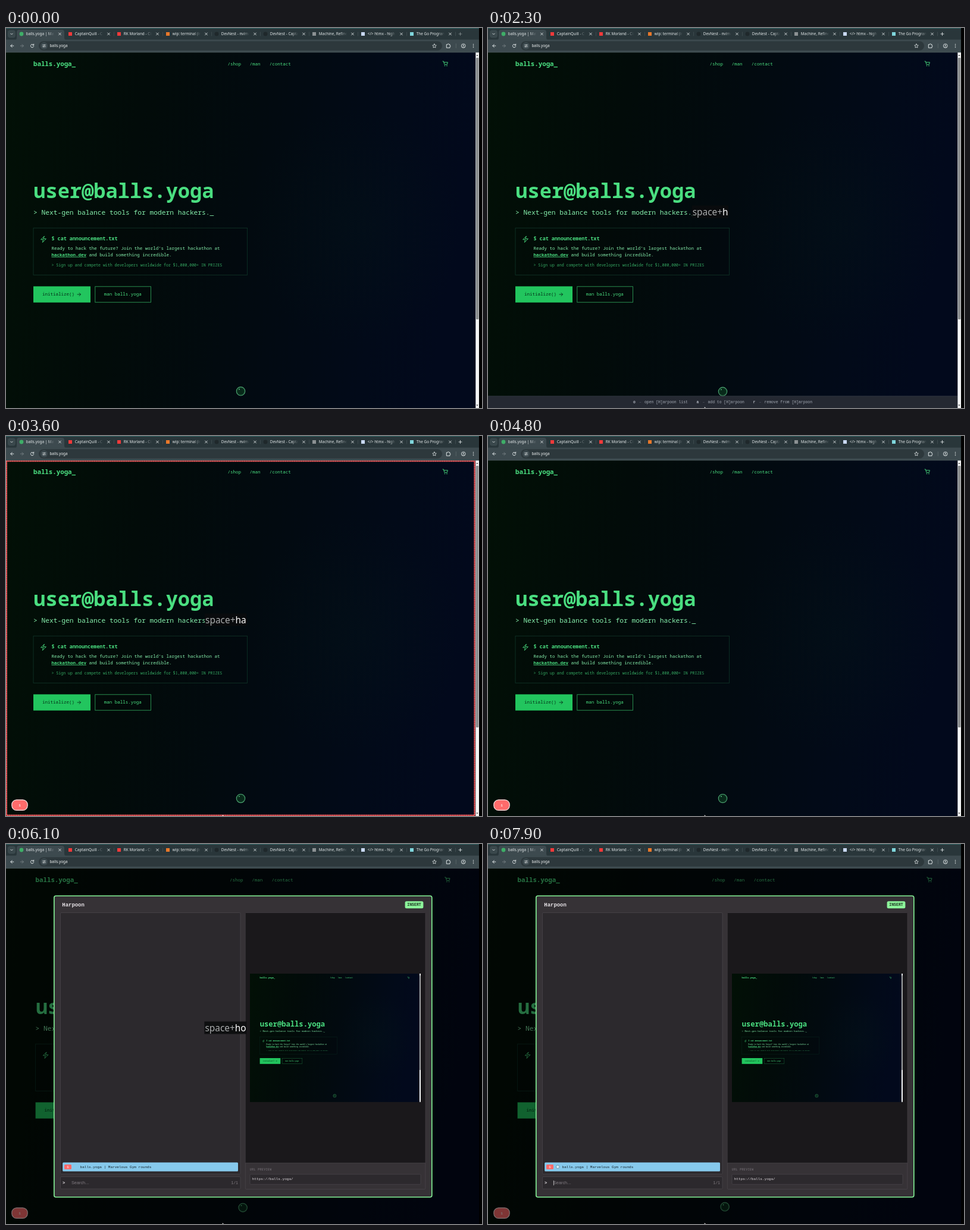
These frames come from a looping animation (800x639 px, 8000 ms). An HTML page:

```html
<!DOCTYPE html>
<html lang="en">
<head>
<meta charset="utf-8">
<title>balls.yoga</title>
<style>
html, body { margin: 0; width: 100%; height: 100%; overflow: hidden; background: #000; }
svg { display: block; width: 100%; height: 100%; }
text { white-space: pre; }
.page { font-family: "Noto Sans Mono", "DejaVu Sans Mono", monospace; }
.ui { font-family: "Noto Sans", "Open Sans", sans-serif; }
.mono { font-family: "Liberation Mono", monospace; }
.sans { font-family: "Liberation Sans", sans-serif; }
.b { font-weight: 700; }
.line { fill: none; stroke-linecap: round; stroke-linejoin: round; }
</style>
</head>
<body>
<svg id="stage" viewBox="0 0 800 639" preserveAspectRatio="none">
  <defs>
    <linearGradient id="night" x1="0" y1="0" x2="1" y2="0.12">
      <stop offset="0" stop-color="#021006"/>
      <stop offset="0.3" stop-color="#020b09"/>
      <stop offset="0.55" stop-color="#020a0f"/>
      <stop offset="0.85" stop-color="#020a19"/>
      <stop offset="1" stop-color="#02091c"/>
    </linearGradient>
    <radialGradient id="glow">
      <stop offset="0" stop-color="#06231c" stop-opacity="0.15"/>
      <stop offset="1" stop-color="#06231c" stop-opacity="0"/>
    </radialGradient>
    <linearGradient id="fade" gradientUnits="userSpaceOnUse" x1="44" y1="0" x2="55" y2="0">
      <stop offset="0" stop-color="#e3e8e9"/>
      <stop offset="1" stop-color="#e3e8e9" stop-opacity="0"/>
    </linearGradient>
    <clipPath id="view"><rect y="41" width="795" height="598"/></clipPath>
  </defs>
</svg>
<script>
const LOOP = 8000;
const GREEN = '#4ade80', PALE = '#86efac', LEAF = '#22c55e';

const esc = s => s.replace(/&/g, '&amp;').replace(/</g, '&lt;').replace(/>/g, '&gt;');
const text = (cls, x, y, size, fill, s, more = '') =>
  `<text class="${cls}" x="${x}" y="${y}" font-size="${size}" fill="${fill}" ${more}>${esc(s)}</text>`;
const rect = (x, y, w, h, fill, more = '') =>
  `<rect x="${x}" y="${y}" width="${w}" height="${h}" fill="${fill}" ${more}/>`;
const circle = (x, y, r, fill, more = '') =>
  `<circle cx="${x}" cy="${y}" r="${r}" fill="${fill}" ${more}/>`;
const line = (d, color, w = 1, more = '') =>
  `<path class="line" d="${d}" stroke="${color}" stroke-width="${w}" ${more}/>`;
const group = (id, body, more = '') => `<g id="${id}" ${more}>${body}</g>`;

function ball() {
  return circle(394.5, 0, 7.2, '#08291a', 'stroke="#4fa874" stroke-width="1.1"') +
    circle(394.5, 0, 5.6, 'none', 'stroke="#0f3d26" stroke-width="1"') +
    circle(392, -3.3, 0.9, '#5fcf8c');
}

function backdrop() {
  return rect(0, 41, 795, 598, 'url(#night)') +
    '<ellipse cx="590" cy="335" rx="180" ry="200" fill="url(#glow)"/>';
}

function content() {
  return text('page b', 46, 63.8, 10.9, GREEN, 'balls.yoga_', 'letter-spacing="-0.08"') +
    text('page', 372.5, 62.6, 7.5, GREEN, '/shop') +
    text('page', 409.6, 62.6, 7.5, GREEN, '/man') +
    text('page', 442.8, 62.6, 7.5, GREEN, '/contact') +
    line('M734 56h1.5l1.4 5.4h4.5l1-3.7h-6.4', GREEN, 0.9) +
    circle(737.4, 63.5, 0.8, GREEN) + circle(741, 63.5, 0.8, GREEN) +
    text('page b', 46.3, 286.2, 33.7, GREEN, 'user@balls.yoga') +
    text('page', 46, 313.6, 11.24, PALE, '> Next-gen balance tools for modern hackers._') +
    rect(46, 336.3, 359.6, 79, '#000', 'fill-opacity="0.06" stroke="#0e3226" stroke-width="0.9"') +
    line('M64.2 350.2l-5.6 5.6h4l-1.2 4.7 6-6h-4.2z', GREEN, 0.9) +
    text('page b', 76.5, 357, 8.42, GREEN, '$ cat announcement.txt') +
    text('page', 76.5, 372.6, 7.49, PALE, 'Ready to hack the future? Join the world’s largest hackathon at') +
    text('page b', 76.5, 383.8, 7.49, GREEN, 'hackathon.dev', 'text-decoration="underline"') +
    text('page', 139.4, 383.8, 7.49, PALE, 'and build something incredible.') +
    text('page', 76.5, 401.2, 6.56, '#35a862', '> Sign up and compete with developers worldwide for $1,000,000+ IN PRIZES') +
    rect(46, 434.4, 96, 27.2, LEAF) +
    text('page', 61, 450.4, 7.5, '#04331a', 'initialize()') +
    line('M120 448h5.6m-2.5-2.5l2.5 2.5-2.5 2.5', '#04331a', 0.9) +
    rect(149.8, 434.8, 93.7, 26.4, '#000', 'fill-opacity="0.06" stroke="#2c9a56" stroke-width="0.9"') +
    text('page', 164.8, 450.4, 7.5, GREEN, 'man balls.yoga');
}

function scrollbar() {
  return rect(789.3, 41, 5.7, 598, '#f4f5f5') +
    rect(790, 50, 4.4, 440, '#8a8d8e', 'rx="1"') +
    '<path d="M790.3 47l1.7-2.2 1.7 2.2zM790.3 633.5l1.7 2.2 1.7-2.2z" fill="#555"/>';
}

const tabs = [
  ['balls.yoga | Marvelous', '#3fae68', 1],
  ['CaptainQuill - ClipBox', '#f03a3a', 0],
  ['RK Morland - ClipBox', '#f03a3a', 0],
  ['wip: terminal (initial)', '#e8782a', 0],
  ['DevNest - nvim-tele', '#1f282b', 1],
  ['DevNest - Captain', '#1f282b', 1],
  ['Machine, Refined', '#8b9193', 0],
  ['</> htmx - high power', '#c9d8f2', 0],
  ['The Go Programming', '#7fd6dc', 0]
];

function tab([title, color, round], i) {
  const icon = round ? circle(0, 10, 3.4, color) : rect(-3, 7, 6, 6, color);
  const edge = i ? line('M73.5 7v6', '#4d5b5f', 0.6) : '';
  return `<g transform="translate(${26 + 82 * i} 0)">${icon}${edge}` +
    text('ui', 7.8, 12.2, 6.4, 'url(#fade)', title) +
    line('M62.6 8.1l3.8 3.8m0-3.8l-3.8 3.8', '#dde3e4', 0.9) + '</g>';
}

function browser() {
  const ink = '#dde3e4';
  return rect(0, 0, 795, 20, '#29363a') + rect(0, 0, 795, 1, '#2e6264') +
    rect(3, 3.5, 13, 13, '#3a484c', 'rx="4"') + line('M7.7 9.2l1.8 1.8 1.8-1.8', ink, 0.9) +
    '<path d="M15 20q3 0 3-4V7q0-4 4-4h72q4 0 4 4v9q0 4 3 4z" fill="#3d4a4f"/>' +
    rect(0, 19.5, 795, 21.5, '#3d4a4f') + rect(0, 40.5, 795, 0.8, '#4a5659') +
    tabs.map(tab).join('') +
    line('M12.8 30h-5m2.4-2.4L7.8 30l2.4 2.4', ink, 1) +
    line('M24.4 30h5m-2.4-2.4l2.4 2.4-2.4 2.4', '#727d80', 1) +
    line('M46.2 28.4a2.7 2.7 0 1 0 .5 2.4M46.7 27v2h-2', ink, 1) +
    rect(55, 22.3, 678, 15.4, '#2d383c', 'rx="7.7"') +
    circle(64, 30, 6, '#3d4a4f') +
    line('M61.5 28.7h2m1.8 0h1.4M61.5 31.4h1m1.8 0h2.4', ink, 0.8) +
    circle(64.4, 28.7, 0.9, ink) + circle(63.4, 31.4, 0.9, ink) +
    text('ui', 73.4, 32.3, 6.4, '#eef1f1', 'balls.yoga') +
    line('M720 26.8l1 2.1 2.3.3-1.7 1.6.4 2.3-2-1.1-2 1.1.4-2.3-1.7-1.6 2.3-.3z', ink, 0.8) +
    line('M740.7 27.7h1.6a1.1 1.1 0 0 1 2.2 0h1.5v1.8a1 1 0 0 1 0 2v1.8h-5.3z', ink, 1) +
    line('M756.3 26.5v7', '#697477', 0.6) +
    circle(768.7, 30, 3.4, 'none', `stroke="${ink}" stroke-width="0.9"`) +
    circle(768.7, 29, 1.1, ink) + line('M766.8 32.2q1.9-1.6 3.8 0', ink, 0.9) +
    [27.4, 30, 32.6].map(y => circle(785.5, y, 0.75, ink)).join('') +
    line('M761 10h5m-2.5-2.5v5', ink, 0.9, 'id="plus"');
}

function hints() {
  const items = [
    [244, 'o', 'open [H]arpoon list'],
    [350.5, 'a', 'add to [H]arpoon'],
    [445.5, 'r', 'remove from [H]arpoon']
  ];
  return rect(0, 619, 789, 20, '#252932') + rect(0, 618.6, 789, 0.8, '#363b45') +
    items.map(([x, key, label]) =>
      text('mono b', x, 631.3, 6.4, '#b5bac4', key) +
      text('mono', x + 10, 631.3, 6.4, '#5d636e', '–') +
      text('mono', x + 19, 631.3, 6.4, '#a5abb5', label)).join('');
}

function flash() {
  return rect(1, 42.2, 786.6, 595.6, 'none', 'stroke="#b93c40" stroke-width="2"') +
    rect(1, 42.2, 786.6, 595.6, 'none', 'stroke="#ff6b6b" stroke-width="2" stroke-dasharray="1.6 1.4"');
}

function badge() {
  return rect(9.8, 611.8, 26.4, 17.6, '#ff6b6b', 'rx="8" stroke="#ffe3e3" stroke-width="1.2"') +
    text('mono b', 23, 622.9, 6, '#ffe9e9', '1', 'text-anchor="middle"');
}

function thumbnail() {
  return '<g transform="translate(410 218) scale(.361) translate(0 -41)">' + backdrop() + content() +
    `<g transform="translate(0 610)">${ball()}</g>` + scrollbar() + '</g>';
}

function popup() {
  const edge = 'stroke="#48444a" stroke-width="0.8"';
  return rect(80.8, 87.2, 635, 506.6, '#363236', 'rx="3" stroke="#86f598" stroke-width="1.6"') +
    text('mono b', 94.3, 104.5, 8.95, '#e6e2e6', 'Harpoon') +
    rect(670.6, 96.2, 30.8, 12, '#8df59b', 'rx="2.5"') +
    text('mono b', 686, 104.3, 6.5, '#1d3522', 'INSERT', 'text-anchor="middle"') +
    rect(91.5, 115.5, 302.5, 439.5, '#2c292d', `rx="1.5" ${edge}`) +
    rect(95.2, 535.4, 294.8, 15.2, '#86c9ec', 'rx="1.5"') +
    rect(98, 539, 12, 8, '#ff6b6b', 'rx="1.5"') +
    text('mono b', 104, 545.2, 5.5, '#ffe3e3', '1', 'text-anchor="middle"') +
    circle(117.2, 542.9, 2.8, '#cfeaf7', 'id="site" stroke="#55798c" stroke-width="0.7"') +
    text('mono', 124.6, 544.6, 6.06, '#16242d', 'balls.yoga | Marvelous Gym rounds') +
    rect(91.5, 559.5, 302.5, 20.5, '#2c292d', `rx="1.5" ${edge}`) +
    text('mono b', 95, 571.8, 7, '#e6e2e6', '>') +
    text('sans', 110, 572.4, 7.3, '#817c82', 'Search...') +
    text('mono', 378.3, 572, 6.5, '#837e84', '1/1') +
    line('M110.4 566.3v7.4', '#eee', 0.7, 'id="caret"') +
    rect(402.3, 115.5, 302.5, 465, '#363236', `rx="1.5" ${edge}`) +
    rect(402.6, 115.8, 302, 420.4, '#1a181b') + line('M402.6 536.4h302', '#48444a', 0.7) +
    thumbnail() +
    text('mono', 409.8, 548.8, 4.9, '#7c777d', 'URL PREVIEW', 'letter-spacing="0.4"') +
    rect(410, 555.3, 287, 17, '#2c292d', `rx="1.5" ${edge}`) +
    text('mono', 413.8, 565.4, 6.06, '#ddd8dd', 'https://balls.yoga/');
}

const keys = rect(0, 298.5, 10, 21, '#0b0c0d', 'id="keyBox" fill-opacity="0.88"') +
  '<text id="keyText" class="ui" x="403.6" y="314.6" font-size="15.4" text-anchor="end">' +
  '<tspan fill="#a9abac">space</tspan><tspan id="plusSign" fill="#a9abac"></tspan>' +
  '<tspan id="typed" fill="#fff"></tspan></text>';

const stage = document.getElementById('stage');
stage.insertAdjacentHTML('beforeend',
  rect(0, 0, 800, 639, '#000') +
  `<g clip-path="url(#view)">${backdrop()}` +
  group('content', content() + group('ball', ball())) +
  group('scroll', scrollbar()) + group('hints', hints()) + group('badge', badge()) +
  group('flash', flash()) + rect(0, 41, 795, 598, '#000', 'id="dim" fill-opacity="0.5"') +
  group('popup', popup()) + '</g>' +
  browser() + group('keys', keys) +
  group('pointer', '<path d="M363.8 639v-2l2 2z" fill="#fff"/>'));

const $ = id => document.getElementById(id);
const show = (id, on) => $(id).setAttribute('visibility', on ? 'visible' : 'hidden');
const within = (t, a, b) => t >= a && t < b;

// Pressed keys after "space", each held until the next entry; null hides them.
const typing = [[0, null], [2000, ''], [2200, 'h'], [2800, 'ha'], [4100, null],
  [5500, ''], [5700, 'h'], [6000, 'ho'], [7100, null]];
const parts = ['hints', 'badge', 'flash', 'dim', 'popup', 'scroll', 'keys', 'pointer', 'site', 'caret'];
const OPEN = 6000;

function drawKeys(t) {
  const typed = typing.filter(([at]) => at <= t).pop()[1];
  if (typed === null) return false;
  $('plusSign').textContent = typed ? '+' : '';
  $('typed').textContent = typed;
  const w = $('keyText').getComputedTextLength() + 1;
  $('keyBox').setAttribute('x', 403.6 - w);
  $('keyBox').setAttribute('width', w + 0.6);
  return true;
}

function draw(t) {
  const open = t >= OPEN;
  const on = {
    hints: within(t, 2200, 2800) || within(t, 5700, OPEN),
    badge: t >= 2800,
    flash: within(t, 2800, 3700),
    dim: open,
    popup: open,
    scroll: !open,
    keys: drawKeys(t),
    pointer: t >= 500,
    site: t >= 6500,
    caret: open && (t - OPEN - 300) % 1000 >= 500
  };
  parts.forEach(id => show(id, on[id]));
  $('plus').setAttribute('stroke-opacity', t < 500 ? 0.45 : 1);
  $('content').setAttribute('transform', `translate(${open ? 3.6 : 0} 0)`);
  const y = 610.4 + 1.2 * Math.cos((t - 200) / 1000 * 2 * Math.PI);
  $('ball').setAttribute('transform', `translate(0 ${y.toFixed(2)})`);
}

const start = performance.now();
function tick() {
  draw((performance.now() - start) % LOOP);
  requestAnimationFrame(tick);
}
tick();
</script>
</body>
</html>
```
